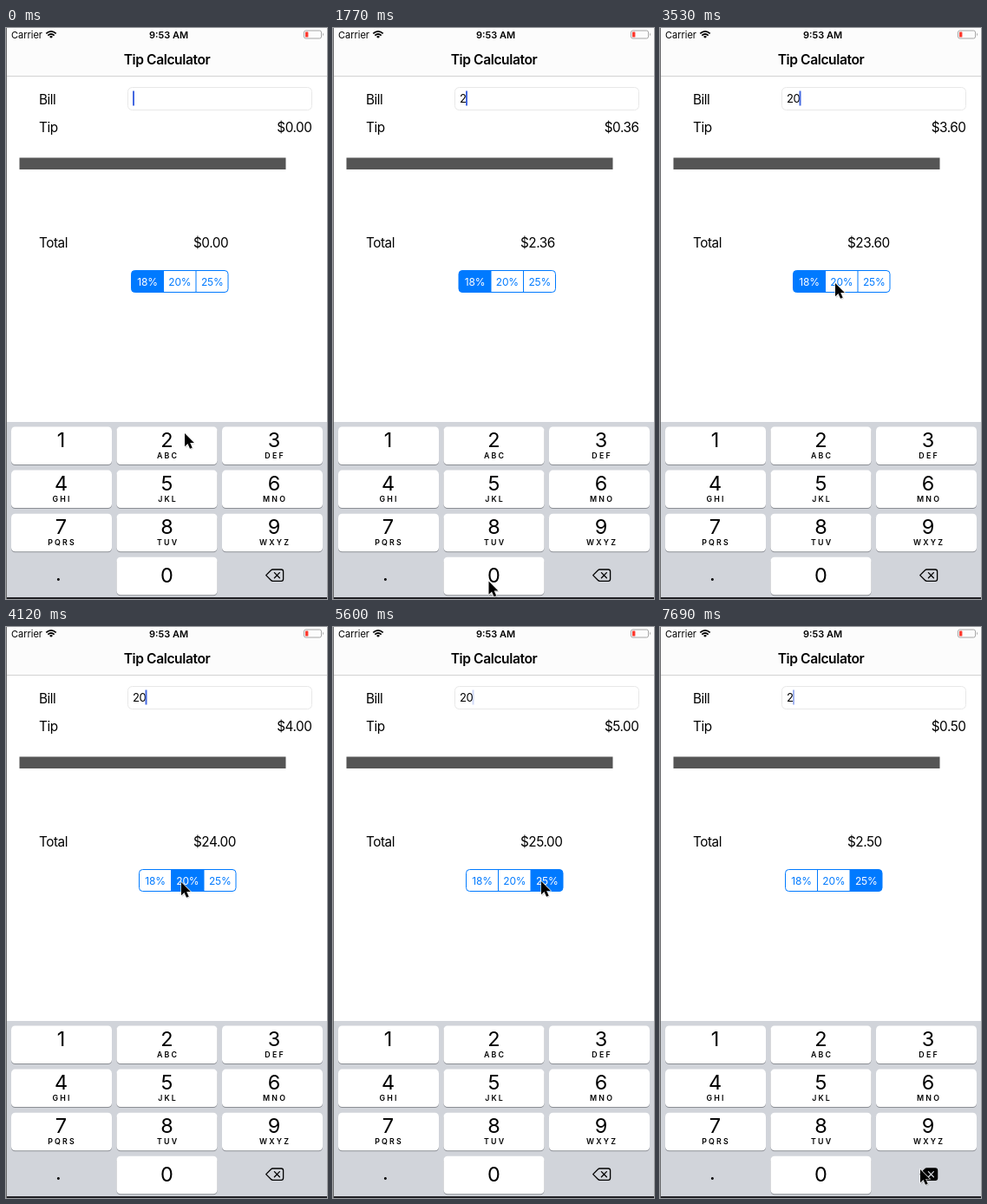
Recreate the animation shown at these times as an HTML page. Size 370x658 px, loop 7.99 s.

```html
<!DOCTYPE html>
<html lang="en">
<head>
<meta charset="utf-8">
<title>Tip Calculator</title>
<style>
  html, body { margin: 0; width: 100%; height: 100%; overflow: hidden; background: #fff; }
  svg { display: block; width: 370px; height: 658px; font-family: Inter, Roboto, sans-serif; }
  .label { font-size: 15.3px; letter-spacing: -.45px; }
  .status { font-size: 11px; }
  .title { font-size: 15.6px; font-weight: 600; letter-spacing: -.4px; }
  .mid { text-anchor: middle; }
  .end { text-anchor: end; }
  .segment { font-size: 12px; letter-spacing: -.2px; }
  .field { font-size: 13px; letter-spacing: -.5px; }
  .digit { font-size: 23.5px; }
  .letters { font-size: 8.8px; font-weight: 600; letter-spacing: 2.2px; }
</style>
</head>
<body>
<svg viewBox="0 0 370 658">
  <rect width="370" height="55" fill="#fcfcfc"/>
  <path d="M0 55.5H370" stroke="#d2d2d2"/>

  <text class="status" x="6" y="11.5">Carrier</text>
  <g fill="none" stroke="#000" stroke-width="1.7">
    <path d="M46.3 6.4Q52 1.4 57.7 6.4M48.3 8.7Q52 5.3 55.7 8.7"/>
    <path d="M52 11.8L50 9.9Q52 8.3 54 9.9Z" fill="#000" stroke="none"/>
  </g>
  <text class="status mid" x="187.5" y="11.5" font-weight="600">9:53 AM</text>
  <rect x="343.5" y="3" width="20" height="9" rx="2" fill="none" stroke="#a5a5a5"/>
  <rect x="345" y="4.5" width="3.4" height="6" rx=".6" fill="#ff3b30"/>
  <path d="M365 5.8Q367 7.5 365 9.2Z" fill="#a5a5a5"/>
  <text class="title mid" x="185.5" y="41.5">Tip Calculator</text>

  <text class="label" x="38" y="87.5">Bill</text>
  <text class="label" x="38" y="119.5">Tip</text>
  <text class="label" x="38" y="252.5">Total</text>
  <rect x="140.5" y="68.5" width="212" height="26" rx="5" fill="#fff" stroke="#e8e8e8"/>
  <text id="bill" class="field" x="146" y="86"></text>
  <rect id="caret" y="72.5" width="2" height="17" fill="#4468e0"/>
  <text id="tip" class="label end" x="352.5" y="119.5"></text>
  <rect x="15.5" y="149.5" width="307" height="13.5" fill="#555"/>
  <text id="total" class="label" x="216" y="252.5"></text>

  <clipPath id="round"><rect x="144.5" y="279.5" width="111.5" height="25" rx="4"/></clipPath>
  <g id="segments">
    <g id="cells" clip-path="url(#round)"></g>
    <path d="M181.5 279V305M219 279V305" stroke="#007aff"/>
    <rect x="144.5" y="279.5" width="111.5" height="25" rx="4" fill="none" stroke="#007aff"/>
  </g>

  <rect y="454" width="370" height="203" fill="#d1d4da"/>
  <g id="keys"></g>
  <text class="digit mid" x="60.5" y="637">.</text>
  <g id="erase" stroke="#000" stroke-width="1.3" stroke-linejoin="round" stroke-linecap="round">
    <path d="M299.7 630.6L305.3 625Q306.2 624 307.5 624H317.3Q319.6 624 319.6 626.3V635Q319.6 637.3 317.3 637.3H307.5Q306.2 637.3 305.3 636.3Z"/>
    <path id="cross" d="M309.4 627.6L315.4 633.7M315.4 627.6L309.4 633.7"/>
  </g>
  <rect y="656" width="370" height="2" fill="#202024"/>
  <rect width="1" height="658" fill="#6a6a6c"/>

  <g id="pointer">
    <path d="M1 2V17L4.6 13.7 7 19 10 18 7.6 12.5H12Z" fill="#000" opacity=".15"/>
    <path d="M0 0V15.2L3.5 11.9 6 17.8 8.7 16.7 6.2 10.9H10.9Z" stroke="#fff" stroke-width="1.2" paint-order="stroke"/>
  </g>
</svg>
<script>
const LOOP = 7990, STEP = 147.4;
const RATES = [.18, .2, .25];
const $ = id => document.getElementById(id);

function add(parent, tag, attrs, text = '') {
  const el = document.createElementNS('http://www.w3.org/2000/svg', tag);
  for (const name in attrs) el.setAttribute(name, attrs[name]);
  el.textContent = text;
  return parent.appendChild(el);
}

const cells = RATES.map((rate, i) => ({
  fill: add($('cells'), 'rect', { x: 144 + i * 37.5, y: 279, width: 37.5, height: 26, fill: '#007aff' }),
  text: add($('cells'), 'text', { class: 'segment mid', x: 163 + i * 37.4, y: 296.5 }, rate * 100 + '%')
}));

const LETTERS = ['', 'ABC', 'DEF', 'GHI', 'JKL', 'MNO', 'PQRS', 'TUV', 'WXYZ'];
const keys = {};
function addKey(digit, col, row, letters) {
  const x = 6 + col * 121.5, y = 459.5 + row * 50.1, center = [63.5, 185.5, 309][col];
  const shape = { x, width: 116, height: 43.5, rx: 4.5 };
  add($('keys'), 'rect', { ...shape, y: y + 1, fill: '#8b8e94' });
  keys[digit] = add($('keys'), 'rect', { ...shape, y });
  add($('keys'), 'text', { class: 'digit mid', x: center, y: y + (digit ? 23.7 : 29.5) }, digit);
  add($('keys'), 'text', { class: 'letters mid', x: center + 1.1, y: y + 36.3 }, letters);
}
LETTERS.forEach((letters, i) => addKey(i + 1, i % 3, Math.floor(i / 3), letters));
addKey(0, 1, 3, '');

// Pointer stops: step, x, y
const PATH = [
  [0, 206, 467], [4, 206, 467], [5, 205, 472], [10, 180, 638], [14, 179, 637], [15, 179, 634],
  [18, 179, 634], [24, 202, 294], [28, 202, 294], [31, 241, 292], [37, 241, 292], [38, 240, 293],
  [44, 240, 293], [45, 276, 478], [46, 287, 560], [50, 300, 625], [60, 300, 625]
];
function pointerAt(n) {
  const i = PATH.findIndex(stop => stop[0] > n);
  const [n0, x0, y0] = PATH[i - 1], [n1, x1, y1] = PATH[i];
  const p = (n - n0) / (n1 - n0), e = p * p * (3 - 2 * p);
  return [x0 + (x1 - x0) * e, y0 + (y1 - y0) * e];
}

// The caret restarts its blink at every keystroke
function caretOpacity(n) {
  const typed = n < 4 ? 501 : n < 14 ? 590 : n < 52 ? 2060 : 7660;
  const phase = (n * STEP - typed + 1500) % 1000;
  if (phase < 140) return .25;
  if (phase < 460) return 0;
  return phase < 540 ? .5 : 1;
}

function selection(n) {
  const chosen = n < 26 ? 0 : n < 32 ? 1 : 2;
  const fading = n === 26 || n === 32;
  const amounts = RATES.map((_, i) => i === chosen ? (fading ? .35 : 1) : fading && i === chosen - 1 ? .75 : 0);
  return { rate: RATES[chosen], amounts };
}

function draw(t) {
  const n = Math.floor((t + 15) / STEP);
  const bill = n < 4 ? '' : n < 14 || n >= 52 ? '2' : '20';
  const { rate, amounts } = selection(n);
  const money = value => '$' + value.toFixed(2);

  $('bill').textContent = bill;
  $('tip').textContent = money(bill * rate);
  $('total').textContent = money(bill * (1 + rate));
  $('caret').setAttribute('x', [146, 153, 160.5][bill.length]);
  $('caret').setAttribute('opacity', caretOpacity(n));

  const shift = bill === '20' ? 9 : bill && rate === .18 ? .5 : 0;
  $('segments').setAttribute('transform', `translate(${shift} 0)`);
  cells.forEach(({ fill, text }, i) => {
    const a = amounts[i];
    fill.setAttribute('opacity', a);
    text.setAttribute('fill', `rgb(${255 * a},${122 + 133 * a},255)`);
  });

  const pressed = n === 3 ? 2 : n === 13 ? 0 : -1;
  for (const digit in keys) keys[digit].setAttribute('fill', +digit === pressed ? '#b9bdc5' : '#fff');
  const erasing = n >= 52;
  $('erase').setAttribute('fill', erasing ? '#000' : 'none');
  $('cross').setAttribute('stroke', erasing ? '#d1d4da' : '#000');
  $('pointer').setAttribute('transform', `translate(${pointerAt(n)})`);
}

const start = performance.now();
function tick() {
  draw((performance.now() - start) % LOOP);
  requestAnimationFrame(tick);
}
tick();
</script>
</body>
</html>
```
